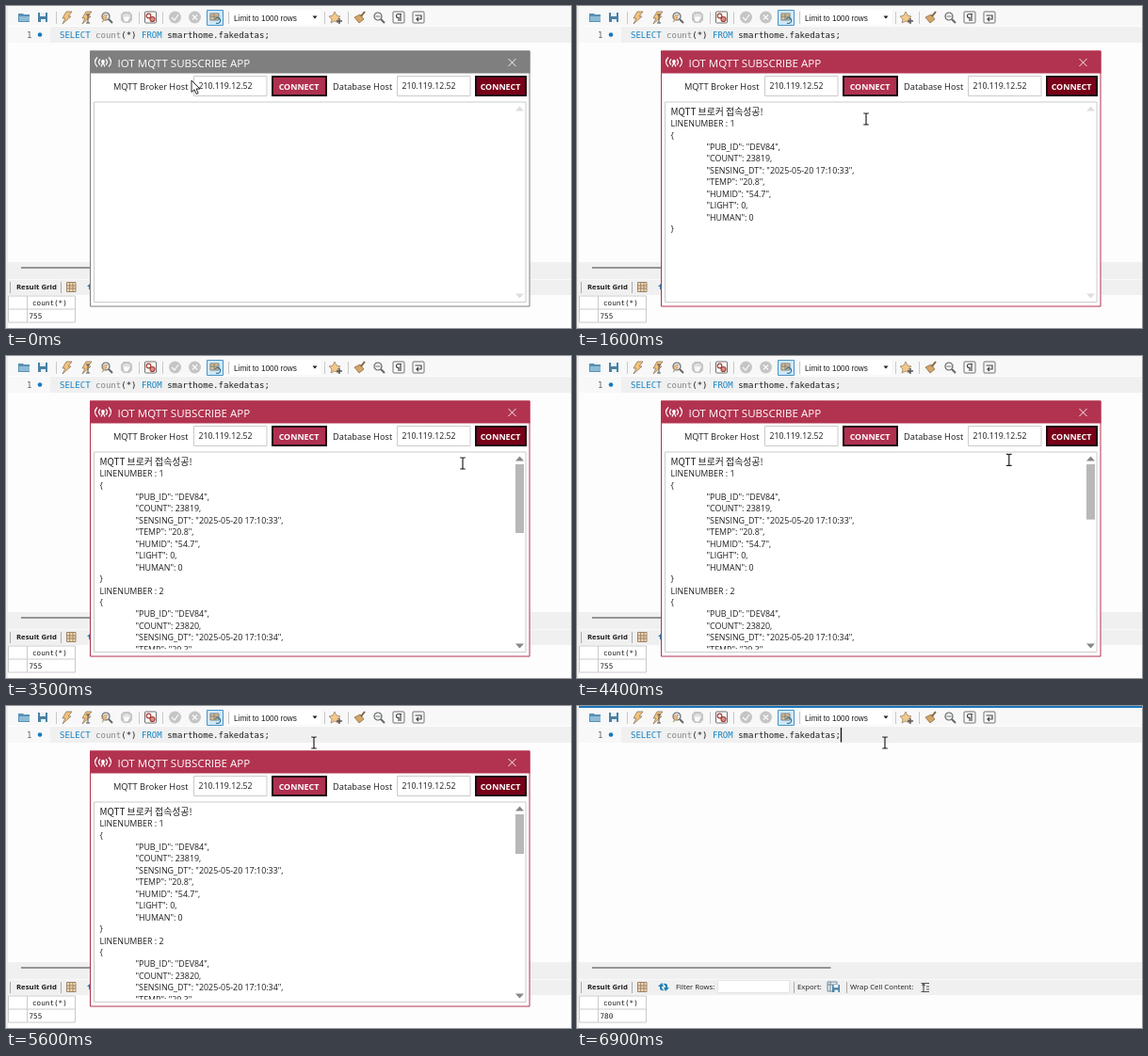
An HTML page for the animation above (7000 ms loop, 600 by 342 pixels).

```html
<!DOCTYPE html>
<html lang="en">
<head>
<meta charset="utf-8">
<style>
  html, body { margin: 0; width: 100%; height: 100%; overflow: hidden; background: #fdfdfd; }
  svg { display: block; width: 600px; height: 342px; font: 7.75px "Open Sans", "Noto Sans", sans-serif; fill: #1c1c1c; }
  .code { font: 9.04px "DejaVu Sans Mono", monospace; white-space: pre; }
  .cell { font: 7.65px "DejaVu Sans Mono", monospace; }
  .combo { font: 8.25px "Liberation Sans", Arial, sans-serif; }
  .key { fill: #1583c4; }
  .bold { font-weight: 700; }
  .log { font-size: 8.9px; }
  .field { font-size: 8.75px; }
  .label { font-size: 9.25px; }
  .korean { font: 9.9px "Noto Sans CJK KR", "Noto Sans CJK", sans-serif; }
  .line { fill: none; stroke-width: 1.2; }
  .box { fill: #fff; stroke: #cbcbcb; }
  .button { stroke: #1d0a10; stroke-width: 2; }
  .connect { font-size: 8.9px; font-weight: 700; fill: #fff; text-anchor: middle; }
  .off { opacity: .45; }
</style>
</head>
<body>
<svg viewBox="0 0 600 342">
  <defs>
    <path id="bolt" d="M-1 -6H5L1 -1H4L-5 7L-2 1H-5Z" fill="#f5c27a" stroke="#8d7860" stroke-width=".8"/>
    <g id="lens" class="line" stroke="#666"><circle cx="-1" cy="-1" r="4" fill="#eef4f8"/><path d="M2 2L6 6" stroke-width="2"/></g>
    <g id="disk"><path d="M-5 -5H5V5H-5Z" fill="#4a81a3"/><path d="M-3 -5H3V-1H-3ZM-2 2H3V5H-2Z" fill="#e8f1f6"/></g>
    <rect id="frame" x="-6" y="-6" width="12" height="12" rx="1" fill="#fafafa" stroke="#707070"/>
  </defs>

  <!-- Query editor -->
  <rect width="2" height="342" fill="#ededed"/>
  <path d="M2 0H600V21H2Z" fill="#f8f8f8"/>
  <path id="focusLine" d="M2 0H600V2H2Z" fill="#1976bd"/>
  <path d="M2 22H600V39H2Z" fill="#f0f0f0"/>
  <path d="M2 22H47V39H2Z" fill="#f8f8f8"/>
  <path d="M53.500 6V19M141.500 6V19M166.500 6V19M236.500 6V19M338.500 6V19M363.500 6V19" stroke="#c8c8c8"/>
  <path d="M13 8H18L19 9H25V17H13Z" fill="#5990b3"/><path d="M14 11H25V16H14Z" fill="#8dbbd6"/>
  <use href="#disk" x="39" y="12"/>
  <use href="#bolt" x="65" y="12"/>
  <use href="#bolt" x="86" y="12"/><path d="M87 9V18M85 9H89M85 18H89" stroke="#555"/>
  <use href="#lens" x="107" y="12"/><use href="#bolt" transform="translate(105 13) scale(.6)"/>
  <g class="off">
    <path d="M125 6H131L134 9V15L131 18H125L122 15V9Z" fill="#888"/><path d="M125 12V9M127 12V8M129 12V8M131 13V9M125 12H131L129 16H126Z" stroke="#fff" fill="#fff"/>
    <circle cx="179.500" cy="12" r="6.500" fill="#888"/><path d="M176 12L179 15L183 9" class="line" stroke="#fff"/>
    <circle cx="200.500" cy="12" r="6.500" fill="#888"/><path d="M198 9.500L203 14.500M203 9.500L198 14.500" class="line" stroke="#fff"/>
  </g>
  <use href="#frame" x="153.500" y="12"/>
  <g class="line" stroke="#a53c35"><circle cx="151.500" cy="10.500" r="2.300"/><circle cx="155.500" cy="14" r="2.500" fill="#d9938a"/></g>
  <path d="M213.500 4.500H230.500V20.500H213.500Z" fill="#cfe8f8" stroke="#4a94c6"/>
  <path d="M217 8H226V15H217Z" fill="#e4bf88" stroke="#7d8283"/><path d="M217 11H226M221 8V15" stroke="#7d8283"/><path d="M223 18A3 3 0 1 0 222 14" class="line" stroke="#35759c"/>
  <path d="M238 4H334V20H238Z" fill="#fff"/>
  <text class="combo" x="242" y="15.500">Limit to 1000 rows</text>
  <path d="M325.500 10.500H330.500L328 13.500Z"/>
  <path d="M349 6L351 10L355 11L352 14L353 18L349 16L345 18L346 14L343 11L347 10Z" fill="#f3c98a" stroke="#8d7860" stroke-width=".7"/><path d="M354 13V19M351 16H357" stroke="#555" stroke-width="1.500"/>
  <path d="M370 12L376 9L380 14L375 18Z" fill="#d3a566" stroke="#7c613c" stroke-width=".7"/><path d="M377 11L381 6" stroke="#7c613c" stroke-width="2"/>
  <use href="#lens" x="396" y="12"/><path d="M392.500 11H397.500" stroke="#777"/>
  <use href="#frame" x="417" y="12"/><path d="M420 8.500H416.500A2 2 0 0 0 416.500 12.500H417V16M419 8.500V16" class="line" stroke="#444"/>
  <use href="#frame" x="438" y="12"/><path d="M434.500 10H441V14H436M438 12L436 14L438 16" class="line" stroke="#444"/>

  <text class="code" x="22" y="34" fill="#666">1</text>
  <circle cx="36" cy="30.500" r="2.300" fill="#1778bd"/>
  <text class="code" x="57" y="34"><tspan class="key">SELECT</tspan> <tspan fill="#858585">count</tspan>(*) <tspan class="key">FROM</tspan> smarthome.fakedatas;</text>
  <path id="caret" d="M280.500 23V38.500" stroke="#111" stroke-width="1.300"/>

  <!-- Results -->
  <path d="M2 272H600V307H2Z" fill="#f0f0f0"/>
  <path d="M2 290.500H600" stroke="#f8f8f8"/>
  <path d="M16 278H269.500" stroke="#777" stroke-width="1.400"/>
  <path d="M4.500 293V305M58.500 293V305M230.500 293V305M286.500 293V305" stroke="#aaa"/>
  <text class="bold" x="11" y="301.200">Result Grid</text>
  <path d="M64.500 293.500H74V303.500H64.500ZM64.500 297H74M64.500 300H74M67.700 293.500V303.500M71 293.500V303.500" fill="#f3d9b0" stroke="#937a60" stroke-width=".9"/>
  <path d="M86 298L90 294L92 298H90Q90 301 93 302Q87 303 88 298ZM98 299L94 303L92 299H94Q94 296 91 295Q97 294 96 299Z" fill="#2680b4"/>
  <text x="105" y="301.200">Filter Rows:</text>
  <path d="M149.500 291.500H225.500V304.500H149.500Z" fill="#fff" stroke="#e4e4e4"/>
  <text x="234" y="301.200">Export:</text>
  <path d="M266 293H276V303H266ZM266 296H276M269 293V303" fill="#e8edf0" stroke="#718794"/><use href="#disk" transform="translate(275 300) scale(.8)"/>
  <text x="290" y="301.200">Wrap Cell Content:</text>
  <path d="M365.500 294.500H374M365.500 303.500H374M368 295V303M366.500 297L368 295L369.500 297M371 298H374M371 301H374" class="line" stroke="#555"/>
  <path id="empty" class="box" d="M2.500 308H22.500V322.500H2.500Z"/>
  <g id="grid">
    <path class="box" d="M2.500 308H73.500V336H2.500ZM2.500 322H73.500M22.500 308V336"/>
    <text class="cell" x="28" y="317.500">count(*)</text>
    <text class="cell" x="24.500" y="332" id="total"></text>
  </g>

  <!-- Subscriber window -->
  <g id="app">
    <path id="frameEdge" d="M89.500 48H556V319H89.500Z" fill="#fff"/>
    <path id="titleBar" d="M89 47.500H556.500V71.500H89Z"/>
    <g class="line" stroke="#fff"><path d="M97 54.500Q92 59.500 97 64.500M100 56.500Q97 59.500 100 62.500M106 56.500Q109 59.500 106 62.500M109 54.500Q114 59.500 109 64.500M101 64.500L103 60L105 64.500"/><circle cx="103" cy="59" r="1.300" fill="#fff"/></g>
    <text x="118.500" y="64.500" font-size="11.550" fill="#fff">IOT MQTT SUBSCRIBE APP</text>
    <path d="M533.500 56L541.500 64M541.500 56L533.500 64" stroke="#fff" stroke-width=".9"/>
    <text class="label" x="114" y="88.500">MQTT Broker Host</text>
    <path id="broker" class="box" d="M199.500 74.500H277V95.500H199.500Z"/>
    <text class="field" x="204.500" y="88">210.119.12.52</text>
    <path class="button" d="M283 75H340V95H283Z" fill="#b0304f"/>
    <text class="connect" x="311" y="88.500">CONNECT</text>
    <text class="label" x="347" y="88.500">Database Host</text>
    <path id="database" class="box" d="M415.500 74.500H493V95.500H415.500Z"/>
    <text class="field" x="420.500" y="88">210.119.12.52</text>
    <path class="button" d="M499 75H552V95H499Z" fill="#780018"/>
    <text class="connect" x="525" y="88.500">CONNECT</text>
    <path class="box" d="M93.500 102H552V314.500H93.500Z"/>
    <clipPath id="view"><path d="M94 102H540V311.500H94Z"/></clipPath>
    <g id="log" clip-path="url(#view)"></g>
    <path id="arrows" d="M541 111.500H550L545.500 106.500ZM541 305.500H550L545.500 310.500Z"/>
    <rect id="thumb" x="541" y="115" width="9"/>
  </g>

  <g id="pointer">
    <path id="arrow" d="M0 0V12.500L3 9.800L5.200 14.500L7.200 13.500L5 9H9Z" fill="#fff" stroke="#111" stroke-width=".9"/>
    <path id="beam" d="M-2.800 -6H-.8L0 -5.300L.8 -6H2.800M0 -5.300V5.300M-2.800 6H-.8L0 5.300L.8 6H2.800" class="line" stroke="#222"/>
  </g>
</svg>

<script>
const LOOP = 7000, STEP = 100;
const CONNECTED = 900, FIRST_MESSAGE = 960, MESSAGE_GAP = 710;
const EDITOR_FOCUS = 5700, QUERY_START = 6000, QUERY_DONE = 6500;
const LINE_HEIGHT = 12.44, VIEW_HEIGHT = 199, TRACK = 187;

// time, x, y
const route = [
  [0, 197, 79], [600, 309, 84], [1000, 311, 86], [1400, 307, 120], [1700, 307, 120],
  [2200, 548, 118], [2400, 548, 119], [3200, 548, 119], [3500, 485, 114],
  [4300, 470, 112], [5000, 268, 83], [5200, 268, 83], [5600, 327, 39], [LOOP, 327, 39]
];

const $ = id => document.getElementById(id);
const show = (id, on) => $(id).style.display = on ? "" : "none";
const paint = (id, attr, colour) => $(id).style[attr] = colour;
const inside = ([x, y], left, top, right, bottom) => x > left && x < right && y > top && y < bottom;

function message(n, temp, humid) {
  const fields = [
    '"PUB_ID": "DEV84",', `"COUNT": ${23818 + n},`, `"SENSING_DT": "2025-05-20 17:10:${32 + n}",`,
    `"TEMP": "${temp}",`, `"HUMID": "${humid}",`, '"LIGHT": 0,', '"HUMAN": 0'
  ];
  return [`LINENUMBER : ${n}`, "{", ...fields, "}"];
}

const lines = ["MQTT 브로커 접속성공!", ...message(1, "20.8", "54.7"), ...message(2, "29.3", "51.2")];
const rows = lines.map((line, i) => {
  const row = document.createElementNS("http://www.w3.org/2000/svg", "text");
  row.setAttribute("class", i ? "log" : "korean");
  row.setAttribute("x", line[0] === '"' ? 137.5 : 99.5);
  row.setAttribute("y", 115.7 + i * LINE_HEIGHT);
  row.textContent = line;
  return $("log").appendChild(row);
});

function pointerAt(t) {
  const i = route.findIndex(stop => stop[0] > t);
  const [t0, x0, y0] = route[i - 1], [t1, x1, y1] = route[i];
  const p = (t - t0) / (t1 - t0), ease = p * p * (3 - 2 * p);
  return [x0 + (x1 - x0) * ease, y0 + (y1 - y0) * ease];
}

function draw(t) {
  const at = pointerAt(t);
  const open = t < EDITOR_FOCUS;
  const accent = t < CONNECTED ? "#7f7f7f" : "#b13350";
  const messages = t < FIRST_MESSAGE ? 0 : 1 + Math.floor((t - FIRST_MESSAGE) / MESSAGE_GAP);
  const lineCount = t < CONNECTED ? 0 : 1 + messages * 10;
  const scrolls = messages > 1;

  show("app", open);
  show("caret", !open);
  show("focusLine", !open);
  paint("titleBar", "fill", accent);
  paint("frameEdge", "stroke", accent);
  rows.forEach((row, i) => row.style.display = i < lineCount ? "" : "none");

  show("thumb", scrolls);
  paint("arrows", "fill", scrolls ? "#888" : "#dedede");
  if (scrolls) $("thumb").setAttribute("height", TRACK * VIEW_HEIGHT / (lineCount * LINE_HEIGHT));
  paint("thumb", "fill", inside(at, 540, 102, 552, 315) ? "#7f7f7f" : "#b8b8b8");

  const onBroker = inside(at, 199, 74, 277, 96), onDatabase = inside(at, 415, 74, 493, 96);
  paint("broker", "stroke", onBroker ? "#808080" : "#cbcbcb");
  paint("database", "stroke", onDatabase ? "#808080" : "#cbcbcb");

  const querying = t >= QUERY_START && t < QUERY_DONE;
  show("grid", !querying);
  show("empty", querying);
  $("total").textContent = t < QUERY_DONE ? 755 : 780;

  const overText = onBroker || onDatabase || inside(at, 93, 101, 540, 315) || inside(at, 47, 21, 600, 47);
  show("beam", overText);
  show("arrow", !overText);
  $("pointer").setAttribute("transform", `translate(${at})`);
}

function tick() {
  draw(Math.floor(performance.now() % LOOP / STEP) * STEP);
  requestAnimationFrame(tick);
}
tick();
</script>
</body>
</html>
```
